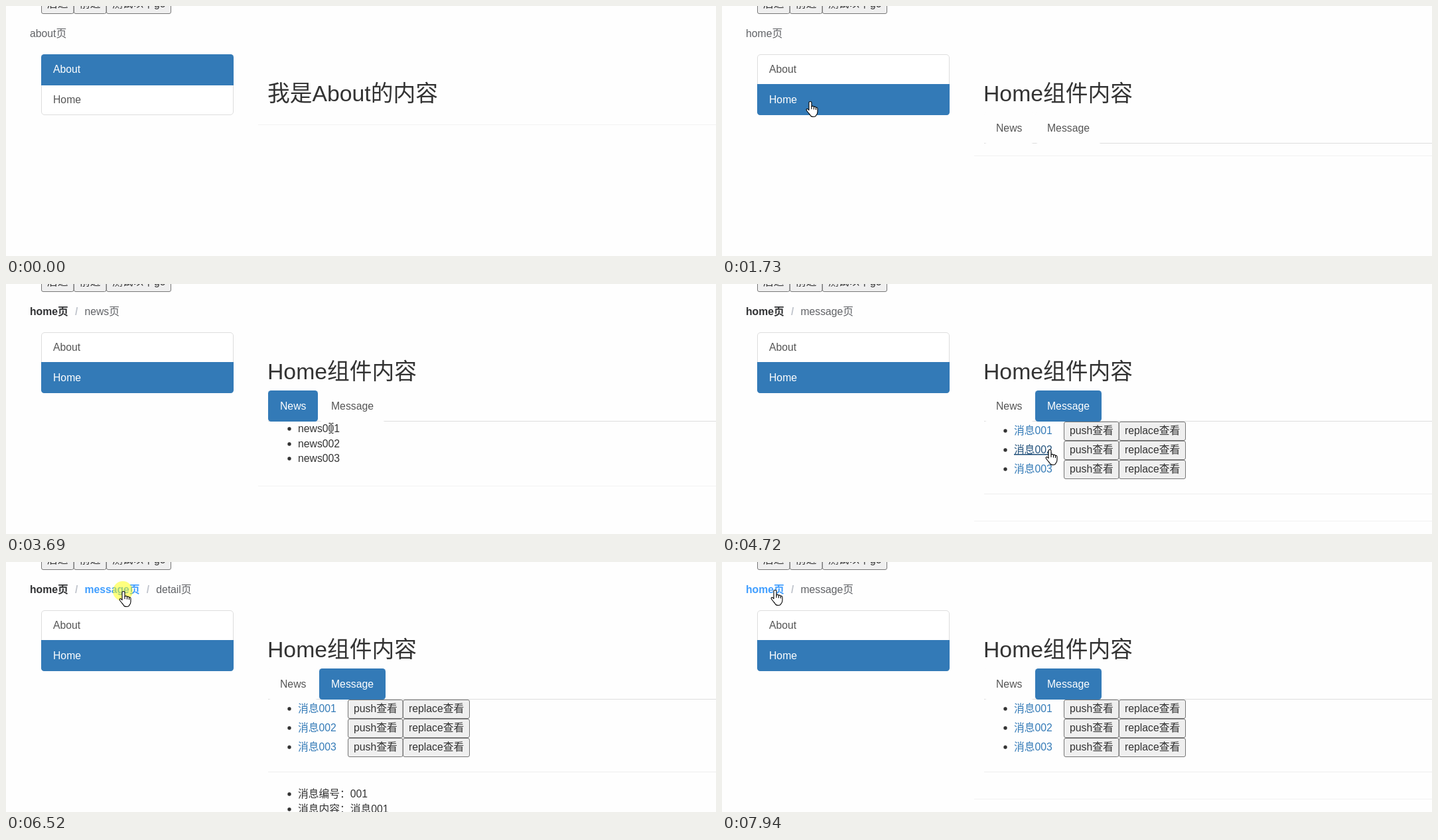
Write an HTML page that moves like this. It is 1070 px wide and 378 px high and loops after 8000 ms.

```html
<!DOCTYPE html>
<html lang="zh-CN">
<head>
<meta charset="utf-8">
<title>Router demo</title>
<style>
  html, body { margin: 0; width: 100%; height: 100%; overflow: hidden; background: #fefefe; }
  svg { display: block; width: 1070px; height: 378px; }
  text { font-family: "Liberation Sans", "Noto Sans CJK SC", sans-serif; font-size: 15.75px; white-space: pre; }
  .h { font-size: 33.75px; }
  .b { font-weight: 700; }
</style>
</head>
<body>
<svg viewBox="0 0 1070 378" lang="zh-CN">
  <defs><clipPath id="list"><rect x="53" y="73" width="290" height="92" rx="4.5"/></clipPath></defs>
  <g id="page"></g>
  <circle id="press" r="15" fill="#ff0" fill-opacity=".5"/>
  <g id="cursor" stroke-linejoin="round">
    <path id="arrow" d="M.5 .5V16.5L4.2 13 6.7 18.6 9 17.6 6.6 12.1H12Z" fill="#fff" stroke="#000"/>
    <g id="hand" stroke="#000" stroke-width="1.1">
      <path fill="#fff" d="M-1 2Q-1 .5 1 .5Q3 .5 3 2V8Q5 6.5 6.5 8.5Q8.5 7.5 9.5 9.5Q12 8.8 12 11.5V16Q12 19 10 21Q9.5 23.5 6 23.5Q2 23.5 1 21Q.5 20 -1 18.5L-4.5 14Q-5.5 11.5 -3.5 11.5Q-2.5 11.5 -1 13.5Z"/>
      <path fill="none" d="M3 8V12M6.5 8.5V12.5M9.5 9.5V13"/>
    </g>
    <g id="beam" fill="none">
      <path d="M-3.5-7.5H-1L0-6.5 1-7.5H3.5M0-6.5V6.5M-3.5 7.5H-1L0 6.5 1 7.5H3.5" stroke="#fff" stroke-width="3"/>
      <path d="M-3.5-7.5H-1L0-6.5 1-7.5H3.5M0-6.5V6.5M-3.5 7.5H-1L0 6.5 1 7.5H3.5" stroke="#000"/>
    </g>
  </g>
</svg>
<script>
const LOOP = 8000, BLUE = '#337ab7', INK = '#333';
const $ = id => document.getElementById(id);

// time, x, y, cursor shape held from that time on
const path = [
  [130, 755, 328, 'arrow'], [330, 600, 255, 'arrow'], [500, 335, 160, 'hand'],
  [620, 190, 113, 'hand'], [750, 145, 130, 'hand'], [890, 145, 130, 'hand'],
  [1100, 131, 144, 'hand'], [1730, 131, 144, 'hand'], [1900, 268, 146, 'hand'],
  [2030, 350, 200, 'arrow'], [2180, 400, 232, 'arrow'], [2330, 428, 192, 'hand'],
  [2600, 428, 192, 'arrow'], [2670, 428, 192, 'hand'], [2950, 428, 192, 'hand'],
  [3150, 450, 212, 'beam'], [3350, 470, 215, 'beam'], [3420, 470, 215, 'beam'],
  [3690, 490, 218, 'beam'], [3760, 498, 194, 'hand'], [3900, 498, 194, 'hand'],
  [4030, 494, 232, 'hand'], [4160, 477, 281, 'hand'], [4240, 477, 281, 'hand'],
  [4250, 479, 285, 'hand'], [4510, 479, 285, 'hand'], [4720, 493, 250, 'hand'],
  [4920, 490, 222, 'hand'], [5730, 490, 222, 'hand'], [5790, 450, 248, 'arrow'],
  [5850, 340, 272, 'arrow'], [5920, 210, 160, 'hand'], [5980, 100, 78, 'hand'],
  [6120, 100, 78, 'hand'], [6370, 176, 44, 'hand'], [6700, 176, 44, 'arrow'],
  [6920, 303, 189, 'arrow'], [7200, 303, 189, 'arrow'], [7460, 126, 58, 'arrow'],
  [7550, 126, 58, 'arrow'], [7820, 79, 43, 'hand'], [7940, 79, 42, 'hand']
];
const presses = [[1240, 1430], [2600, 2740], [3780, 3870], [5120, 5260], [6430, 6600]];
const pages = [[0, 'about'], [1450, 'home'], [2750, 'news'], [3880, 'message'], [5270, 'detail'], [6620, 'message']];

// left, top, right, bottom
const areas = {
  crumb0: [36, 34, 94, 51], crumb1: [118, 34, 202, 51],
  About: [53, 73, 343, 119], Home: [53, 119, 343, 165],
  News: [395, 161, 470, 208], Message: [472, 161, 572, 208],
  link1: [440, 213, 498, 231], link2: [440, 242, 498, 260], link3: [440, 271, 498, 291]
};

const text = (x, y, s, fill = INK, more = '') => `<text x="${x}" y="${y}" fill="${fill}" ${more}>${s}</text>`;
const rect = (x, y, w, h, fill, more = '') => `<rect x="${x}" y="${y}" width="${w}" height="${h}" fill="${fill}" ${more}/>`;
const line = (x, y, fill) => rect(x, y, 1070 - x, 1, fill);
const dot = y => `<circle cx="427" cy="${y}" r="2.7" fill="${INK}"/>`;
const button = (x, y, w, s) =>
  rect(x + .5, y + .5, w - 1, 28, '#efefef', 'rx="2.5" stroke="#767676"') + text(x + 9, y + 19, s);
const bullet = (y, s) => dot(y - 5) + text(440, y, s);

function crumbs(names, hover) {
  let x = 36, out = '';
  const widths = [57.8, 83.2];
  names.forEach((s, i) => {
    if (i === names.length - 1) { out += text(x, 47, s, '#606266'); return; }
    out += text(x, 47, s, hover === 'crumb' + i ? '#409eff' : '#303133', 'class="b"');
    x += widths[i] + 10.1;
    out += text(x, 47, '/', '#c0c4cc', 'class="b"');
    x += 14.5;
  });
  return out;
}

function sidebar(active, hover) {
  const rows = ['About', 'Home'];
  const fill = s => s === hover ? '#f5f5f5' : '#fff';
  const on = rows.indexOf(active);
  return '<g clip-path="url(#list)">' +
    rows.map((s, i) => rect(53, 73 + i * 46, 290, 46, fill(s))).join('') + '</g>' +
    rect(53.5, 73.5, 289, 91, 'none', 'rx="4.5" stroke="#ddd"') +
    `<g clip-path="url(#list)">${rect(53, on ? 118 : 73, 290, 47, BLUE)}</g>` +
    rows.map((s, i) => text(71, 101 + i * 46, s, i === on ? '#fff' : '#555')).join('');
}

function tab(s, x, w, active, hover) {
  const on = s === active, over = s === hover && !on;
  return rect(x, 161, w, 47, on ? BLUE : over ? '#eee' : '#fefefe', 'rx="4.5"') +
    (over ? rect(x, 207, w, 1, '#ddd') : '') +
    text(x + 18, 190, s, on ? '#fff' : '#555');
}

function messages(hover) {
  return [1, 2, 3].map(n => {
    const y = 179 + n * 29, over = hover === 'link' + n;
    return dot(y + 14) +
      text(440, y + 19, '消息00' + n, over ? '#23527c' : BLUE, over ? 'text-decoration="underline"' : '') +
      button(515, y, 83.5, 'push查看') + button(598, y, 101, 'replace查看');
  }).join('');
}

function draw(page, hover) {
  const about = page === 'about', inbox = page === 'message' || page === 'detail';
  const trail = {
    about: ['about页'], home: ['home页'], news: ['home页', 'news页'],
    message: ['home页', 'message页'], detail: ['home页', 'message页', 'detail页']
  }[page];
  const bottom = { about: 179, home: 226, news: 305, message: 358 }[page];
  const active = page === 'news' ? 'News' : inbox ? 'Message' : '';
  let out = button(53, -17, 49.5, '后退') + button(102, -17, 49.5, '前进') + button(151, -17, 98, '测试以下go') +
    crumbs(trail, hover) + sidebar(about ? 'About' : 'Home', hover) +
    text(394, 144, about ? '我是About的内容' : 'Home组件内容', INK, 'class="h"');
  if (!about) out += line(395, 207, '#ddd') + tab('News', 395, 75, active, hover) + tab('Message', 472, 100, active, hover);
  if (page === 'news') out += [1, 2, 3].map(n => bullet([224, 247, 269][n - 1], 'news00' + n)).join('');
  if (inbox) out += messages(hover) + line(395, 317, '#eee');
  if (page === 'detail') out += bullet(356, '消息编号：001') + bullet(379, '消息内容：消息001');
  if (bottom) out += line(380, bottom, '#f2f2f2');
  return out;
}

const last = (rows, t) => rows.filter(r => r[0] <= t).pop();

function pointer(t) {
  const a = last(path, t);
  if (!a) return null;
  const b = path[path.indexOf(a) + 1] || a;
  const k = b === a ? 0 : (t - a[0]) / (b[0] - a[0]);
  return { x: a[1] + (b[1] - a[1]) * k, y: a[2] + (b[2] - a[2]) * k, shape: a[3] };
}

function hit(p) {
  return Object.keys(areas).find(k => {
    const [l, t, r, b] = areas[k];
    return p.x >= l && p.x < r && p.y >= t && p.y < b;
  }) || '';
}

let shown = '';
function frame(now) {
  const t = now % LOOP, p = pointer(t), page = last(pages, t)[1], hover = p ? hit(p) : '';
  const key = page + ' ' + hover;
  if (key !== shown) {
    $('page').innerHTML = draw(page, hover);
    shown = key;
  }
  $('cursor').style.display = p ? '' : 'none';
  const down = p && presses.some(([a, b]) => t >= a && t < b);
  $('press').style.display = down ? '' : 'none';
  if (p) {
    const at = `translate(${Math.round(p.x)} ${Math.round(p.y)})`;
    $('cursor').setAttribute('transform', at);
    $('press').setAttribute('transform', at);
    for (const s of ['arrow', 'hand', 'beam']) $(s).style.display = s === p.shape ? '' : 'none';
  }
}

const start = performance.now();
function tick() {
  frame(performance.now() - start);
  requestAnimationFrame(tick);
}
tick();
</script>
</body>
</html>
```
